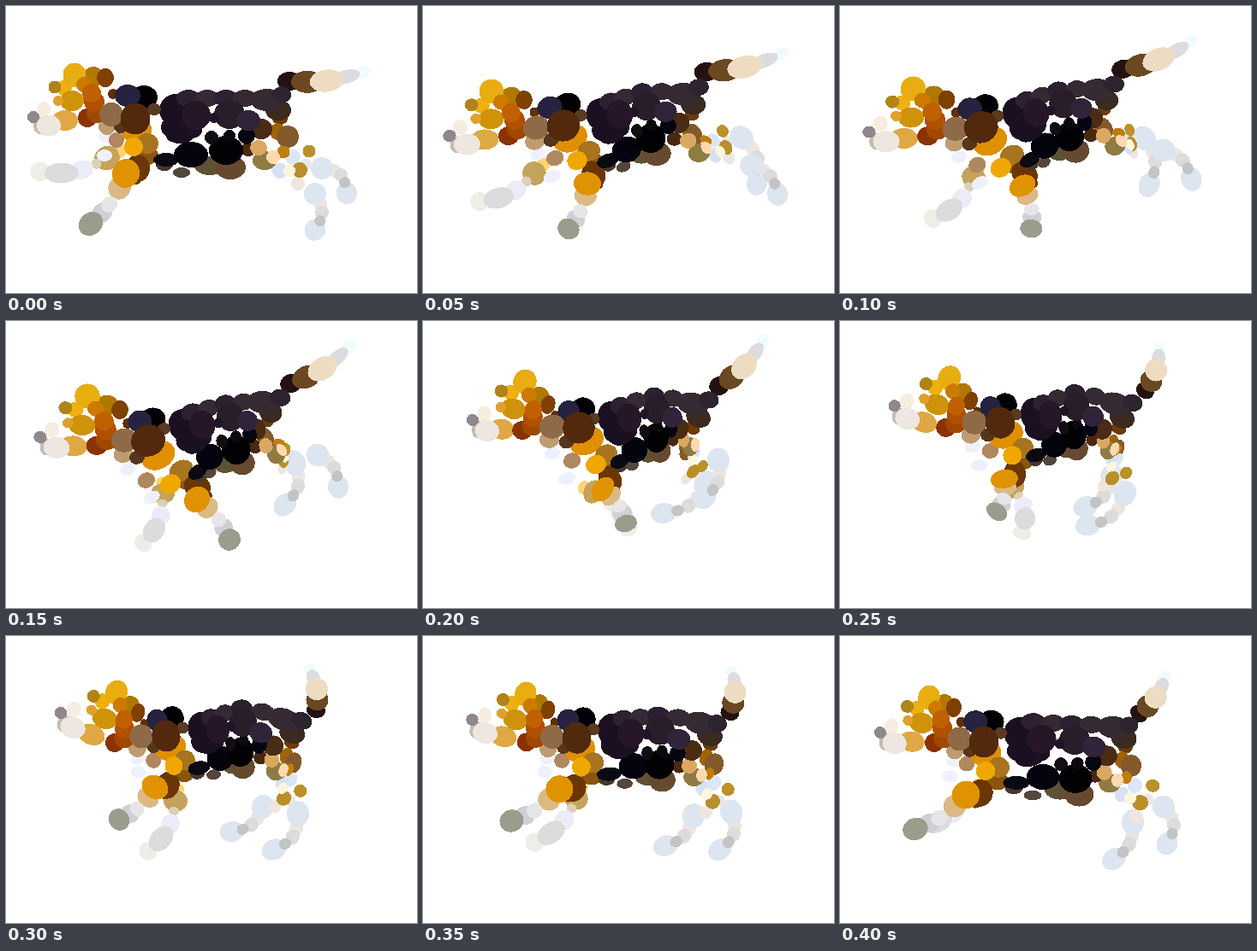
Recreate the animation shown at these times as an HTML page. Size 480 by 336 pixels, loop 0.45 s.

```html
<!DOCTYPE html>
<html lang="en">
<head>
<meta charset="utf-8">
<title>Running dog</title>
<style>
html, body { margin: 0; width: 100%; height: 100%; overflow: hidden; background: #fff; }
svg { display: block; width: 480px; height: 336px; }
</style>
</head>
<body>
<svg id="stage" viewBox="0 0 480 336" shape-rendering="crispEdges"></svg>
<script>
const LOOP = 450, STEP = 50;
const POSES = [0, 50, 150, 200, 300, 400];

// Each joint: x,y at every key pose.
const head = {
  crown: [80,81, 80,100, 95,88, 119,71, 129,66, 104,72],
  nose: [32,130, 31,152, 40,136, 58,116, 64,90, 47,113],
  ear: [116,84, 118,110, 133,104, 146,98, 154,90, 133,84],
  chin: [95,131, 100,152, 106,146, 116,128, 127,125, 110,125],
  collar: [151,132, 164,140, 166,140, 182,125, 187,117, 168,124]
};
const trunk = {
  chest: [149,165, 180,181, 192,191, 202,168, 196,152, 170,158],
  withers: [198,122, 208,127, 207,122, 220,113, 228,108, 210,114],
  back: [261,127, 261,117, 262,112, 273,103, 277,101, 274,122],
  rump: [305,110, 304,103, 300,95, 315,97, 325,98, 320,107],
  haunch: [329,153, 317,150, 304,137, 309,151, 335,149, 340,152],
  hip: [312,177, 331,166, 322,151, 318,145, 324,157, 324,169],
  brisket: [216,174, 238,168, 238,159, 247,151, 250,143, 237,165],
  belly: [257,169, 266,155, 269,151, 272,137, 274,136, 275,167]
};
const limbs = {
  nearFore: [[140,196, 192,208, 223,209, 210,197, 174,177, 147,186],
             [99,255, 170,261, 261,256, 237,237, 132,215, 88,226]],
  farFore: [[118,178, 130,196, 183,202, 199,200, 198,193, 152,186],
            [40,194, 66,229, 160,260, 240,243, 166,252, 92,224]],
  outerHind: [[369,190, 372,154, 337,166, 330,190, 341,208, 378,200],
              [398,219, 390,207, 326,215, 281,225, 313,250, 382,243]],
  innerHind: [[361,220, 384,187, 364,157, 345,163, 300,200, 342,218],
              [361,262, 414,220, 388,194, 329,207, 264,229, 320,261]],
  tail: [[331,88, 331,77, 333,73, 346,76, 362,87, 349,91],
         [417,77, 418,56, 401,30, 397,23, 354,39, 380,47]]
};
const pins = [...Object.values(head), ...Object.values(trunk),
  limbs.nearFore[0], limbs.outerHind[0], limbs.tail[0]];

// Cyclic cubic through the key poses
function at(joint, t) {
  const n = POSES.length, i = POSES.findLastIndex(k => k <= t);
  const time = k => POSES[(k + n) % n] + LOOP * Math.floor(k / n);
  const span = time(i + 1) - time(i), u = (t - time(i)) / span;
  return [0, 1].map(axis => {
    const v = k => joint[(k + n) % n * 2 + axis];
    const slope = k => (v(k + 1) - v(k - 1)) / (time(k + 1) - time(k - 1)) * span;
    const a = v(i), b = v(i + 1), c = slope(i), d = slope(i + 1);
    return a + u * (c + u * (3 * (b - a) - 2 * c - d + u * (2 * (a - b) + c + d)));
  });
}

// Moving least squares: the local turn, stretch and shift that the pins give a rest point
function bend(x, y, moves) {
  const weights = moves.map(([p]) => 1 / ((p[0] - x) ** 2 + (p[1] - y) ** 2 + 9) ** 2);
  const total = weights.reduce((a, b) => a + b);
  const mean = (side, axis) =>
    moves.reduce((sum, m, i) => sum + weights[i] * m[side][axis], 0) / total;
  const px = mean(0, 0), py = mean(0, 1), qx = mean(1, 0), qy = mean(1, 1);
  let re = 0, im = 0, size = 0;
  moves.forEach(([p, q], i) => {
    const a = p[0] - px, b = p[1] - py, c = q[0] - qx, d = q[1] - qy, w = weights[i];
    re += w * (a * c + b * d);
    im += w * (a * d - b * c);
    size += w * (a * a + b * b);
  });
  re /= size;
  im /= size;
  const dx = x - px, dy = y - py;
  return [qx + re * dx - im * dy, qy + im * dx + re * dy,
    Math.atan2(im, re), Math.hypot(re, im)];
}

function ellipse(fill, rx, ry) {
  const el = document.createElementNS('http://www.w3.org/2000/svg', 'ellipse');
  el.setAttribute('fill', fill);
  el.setAttribute('ry', ry);
  stage.append(el);
  return (x, y, angle, stretch) => {
    el.setAttribute('rx', rx * Math.min(1.15, Math.max(0.65, stretch)));
    el.setAttribute('transform', `translate(${x} ${y}) rotate(${angle * 180 / Math.PI})`);
  };
}

const updates = [];

// Blobs [fill, x, y, rx, ry] that follow the body
function skin(...blobs) {
  for (const [fill, x, y, rx, ry = rx] of blobs) {
    const put = ellipse(fill, rx, ry);
    updates.push((t, moves) => put(...bend(x, y, moves)));
  }
}

// Beads [fill, place from root to end, rx, ry] on a bowed line
function limb([root, end], bow, beads) {
  const length = Math.hypot(end[0] - root[0], end[1] - root[1]);
  for (const [fill, u, rx, ry = rx] of beads) {
    const put = ellipse(fill, rx, ry);
    updates.push(t => {
      const [x, y] = at(root, t), [ex, ey] = at(end, t);
      const dx = ex - x, dy = ey - y, now = Math.hypot(dx, dy);
      const side = bow * Math.sin(Math.PI * u) / now;
      const lean = Math.atan(bow * Math.PI * Math.cos(Math.PI * u) / now);
      put(x + dx * u + dy * side, y + dy * u - dx * side,
        Math.atan2(dy, dx) - lean, now / length);
    });
  }
}

const hindBeads = [
  ['#efe5df', 0.3, 8], ['#dde5f0', 0, 13], ['#dcdcdc', 0.52, 8],
  ['#dde5f0', 1, 13, 12], ['#c4c4c4', 0.75, 6.5]
];

limb(limbs.farFore, 8, [
  ['#ffd470', -0.2, 8], ['#c4a35c', 0, 15, 14], ['#dcd0b8', 0.17, 6],
  ['#ececf8', 0.4, 14, 11], ['#eeeee6', 1, 12, 11], ['#dcdcdc', 0.7, 20, 12]
]);
limb(limbs.outerHind, 10, hindBeads);
limb(limbs.innerHind, 8, hindBeads);
limb(limbs.tail, -5, [
  ['#241212', 0, 14, 11], ['#6a4822', 0.24, 19, 13], ['#eefcfc', 1, 9, 7],
  ['#dcdce0', 0.76, 17, 8], ['#eedcc2', 0.5, 20, 13]
]);

// Haunch
skin(
  ['#6e3a08', 320, 132, 9, 7], ['#a06405', 317, 147, 9, 10], ['#845a2c', 329, 153, 13],
  ['#dce6f6', 335, 177, 9], ['#ebe6e6', 350, 186, 7], ['#efe6e0', 341, 208, 8],
  ['#d8e0f4', 320, 193, 9], ['#b8902a', 343, 192, 9], ['#fdf6dc', 331, 193, 7],
  ['#bb9128', 354, 170, 7.5], ['#c07d0a', 324, 171, 7.5],
  ['#8f7c42', 302, 181, 14, 11], ['#ffd8ae', 312, 177, 8], ['#4a2810', 283, 168, 9, 8],
  ['#dba862', 295, 166, 10, 9], ['#4a2c14', 298, 144, 13, 12]
);

// Throat and upper foreleg
skin(
  ['#eef1fc', 116, 153, 8, 7], ['#eef1fc', 115, 175, 9, 7],
  ['#bf9c70', 118, 141, 10], ['#b08860', 129, 157, 9],
  ['#e08f00', 152, 145, 18, 16], ['#8a5510', 165, 175, 13, 11], ['#a87420', 165, 161, 13, 12],
  ['#6b3605', 154, 190, 14, 16], ['#6b3605', 152, 203, 6], ['#f0a800', 149, 165, 11]
);
limb(limbs.nearFore, 5, [
  ['#dcb984', 0.25, 14, 13], ['#e09300', 0, 17, 16], ['#cfcfd6', 0.75, 13, 11],
  ['#e6e6e8', 0.57, 10, 9], ['#9b9c8c', 1, 15, 13]
]);

// Belly
skin(
  ['#46382c', 185, 186, 10, 7], ['#54463a', 205, 195, 10, 6],
  ['#5e5236', 238, 187, 18, 11], ['#664a30', 262, 189, 18, 14],
  ['#0a0a12', 187, 180, 15, 8], ['#04040f', 216, 174, 20, 15], ['#020205', 257, 169, 20, 17],
  ['#120c14', 240, 154, 8], ['#060612', 281, 152, 10], ['#0c080e', 261, 152, 7]
);

// Back: a row along the spine, then the larger patches
skin(
  ['#1a1022', 203, 152, 16, 9], ['#1a1022', 198, 122, 19], ['#1a1022', 196, 142, 15, 13],
  ['#1a1022', 217, 145, 12, 10]
);
for (let i = 0; i < 4; i++) {
  skin([i % 2 ? '#352a34' : '#2d2032', 213 + 22 * i, 108, 14, 10]);
}
skin(
  ['#3a2a20', 318, 122, 15, 12], ['#362b32', 305, 110, 20, 13], ['#2d2430', 322, 104, 11, 10],
  ['#281d28', 261, 127, 18, 17], ['#20142a', 243, 131, 6], ['#30233a', 283, 134, 14, 12],
  ['#261628', 222, 128, 17]
);

// Head
skin(
  ['#5f3000', 125, 103, 6], ['#b07800', 102, 83, 12], ['#7f4000', 116, 84, 10, 11],
  ['#f0b010', 68, 96, 9], ['#e8ad10', 80, 81, 13.5, 14.5], ['#b08418', 57, 95, 7.5],
  ['#cf930a', 77, 111, 14, 12], ['#e0a030', 61, 111, 6], ['#dfa844', 69, 134, 15, 12],
  ['#8a3300', 95, 131, 11], ['#a04800', 106, 125, 12], ['#b05000', 103, 112, 12],
  ['#cc7a00', 91, 92, 9], ['#c06000', 100, 102, 11], ['#c4bcb0', 40, 140, 8, 10],
  ['#f5eee0', 44, 121, 8, 9], ['#8f878c', 32, 130, 7], ['#eee6e0', 50, 140, 14, 12.5]
);

// Shoulder
skin(
  ['#54361c', 134, 141, 8], ['#020204', 161, 107, 16, 14], ['#26223f', 142, 105, 15, 13],
  ['#8f6a47', 123, 127, 14], ['#5a3a22', 173, 121, 8, 7], ['#52290c', 151, 132, 17.5, 18.5]
);

const start = performance.now();
let shown = -1;
function frame() {
  const t = Math.floor((performance.now() - start) % LOOP / STEP) * STEP;
  if (t !== shown) {
    shown = t;
    const moves = pins.map(joint => [joint.slice(0, 2), at(joint, t)]);
    updates.forEach(update => update(t, moves));
  }
  requestAnimationFrame(frame);
}
frame();
</script>
</body>
</html>
```
